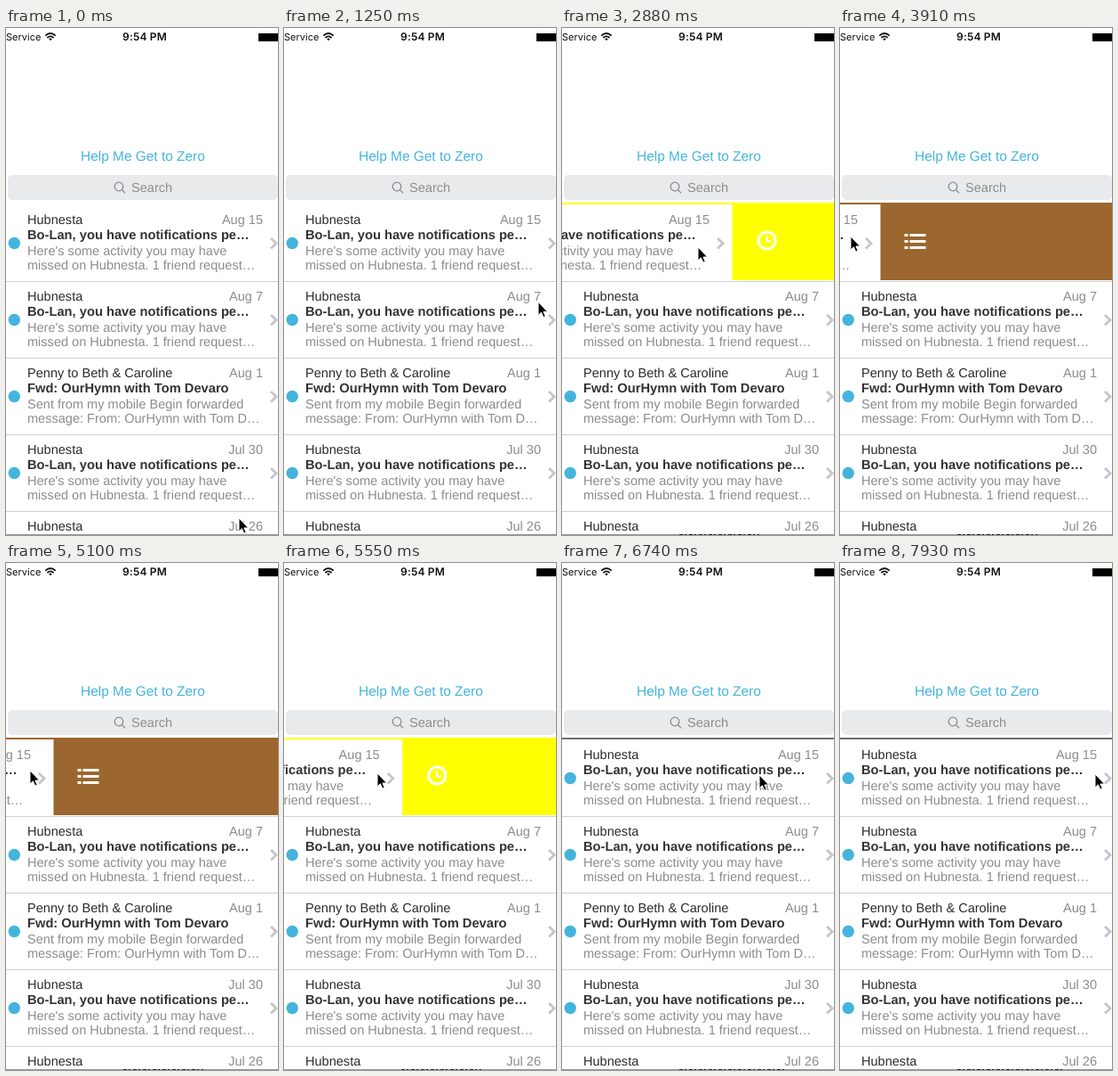
These frames come from a looping animation (306x569 px, 8000 ms). An HTML page:

```html
<!DOCTYPE html>
<html lang="en">
<head>
<meta charset="utf-8">
<title>Swipe a message</title>
<style>
  html, body { margin: 0; width: 100%; height: 100%; overflow: hidden; background: #fff; }
  svg { display: block; width: 306px; height: 569px; }
  text { font: 14.55px "Liberation Sans", sans-serif; fill: #8c8c8c; text-rendering: geometricPrecision; }
  .sender { fill: #2b2b2b; }
  .subject { font-size: 14.7px; font-weight: bold; fill: #333; }
  .date { text-anchor: end; }
  .status { font: 11px Inter, sans-serif; fill: #111; }
  .clock { font-size: 12px; font-weight: 600; letter-spacing: .2px; }
  .button { font-size: 15.45px; fill: #44b4dc; }
  .dot { fill: #44b4dc; }
  .line { fill: none; stroke: #cfcfcf; }
  .chevron { fill: none; stroke: #c5c5c9; stroke-width: 2.8; }
  .icon { fill: none; stroke: #fff; stroke-width: 3; }
</style>
</head>
<body>
<svg viewBox="0 0 306 569">
  <rect width="306" height="569" fill="#fff"/>

  <text class="status" x="0" y="14">Service</text>
  <g fill="none" stroke="#111" stroke-width="1.8">
    <path d="M44.3 8.6Q50 3.4 55.7 8.6M46.4 11Q50 7.8 53.6 11"/>
    <path d="M48.2 12.2Q50 10.8 51.8 12.2L50 14.2z" fill="#111" stroke="none"/>
  </g>
  <text class="status clock" x="131" y="14">9:54 PM</text>
  <rect x="284" y="6" width="22" height="9" fill="#000"/>

  <text class="button" x="84" y="148.6">Help Me Get to Zero</text>
  <rect x="2" y="165" width="304" height="28" rx="5" fill="#e9eaec"/>
  <path d="M130.4 181.6L134 185.2M131.8 178a4.8 4.8 0 1 0-9.6 0a4.8 4.8 0 1 0 9.6 0" fill="none" stroke="#8b8b90" stroke-width="1.3"/>
  <text x="141" y="184">Search</text>

  <g id="actions">
    <rect id="backdrop" y="196" width="306" height="87"/>
    <g id="later" class="icon">
      <circle r="9.6"/>
      <path d="M0-5.5V.8H5" stroke-width="2.2"/>
    </g>
    <path id="list" class="icon" d="M-12-6.5h4m2 0H12M-12 .5h4m2 0H12M-12 7.5h4m2 0H12"/>
  </g>
  <g id="rows"></g>

  <rect y="568" width="306" height="1" fill="#999"/>
  <path id="edge" fill="none" stroke="#222" stroke-dasharray="4 2 2 3"/>
  <path id="cursor" d="M0 0V15L3.4 11.8L5.8 17.2L8.2 16.1L5.9 11H10.6z" fill="#000" stroke="#fff" stroke-width="1" stroke-linejoin="round"/>
</svg>
<script>
const byId = id => document.getElementById(id);

const activity = date => [
  "Hubnesta", date, "Bo-Lan, you have notifications pe…",
  "Here's some activity you may have", "missed on Hubnesta. 1 friend request…"
];
const messages = [
  activity("Aug 15"),
  activity("Aug 7"),
  ["Penny to Beth &amp; Caroline", "Aug 1", "Fwd: OurHymn with Tom Devaro",
   "Sent from my mobile Begin forwarded", "message: From: OurHymn with Tom D…"],
  activity("Jul 30"),
  activity("Jul 26")
];

byId("rows").innerHTML = messages.map(([sender, date, subject, first, second], i) => `
  <g transform="translate(0 ${198 + 86 * i})">
    <g class="row">
      <rect width="314.5" height="86" fill="#fff"/>
      <circle class="dot" cx="9.3" cy="43.5" r="6.7"/>
      <text class="sender" x="24" y="22">${sender}</text>
      <text class="date" x="289" y="22">${date}</text>
      <text class="subject" x="24" y="39">${subject}</text>
      <text x="24" y="56.5">${first}</text>
      <text x="24" y="73.3">${second}</text>
      <path class="chevron" d="M298 38L304 43.7L298 49.4"/>
    </g>
    <path class="line" d="M0 ${i ? .5 : 86.5}H306"/>
  </g>`).join("");
const row = document.querySelector(".row");

// Tracks hold [tick, values...]; a tick is one step of the choppy motion.
const LOOP = 8000, FIRST_TICK = 486, TICK = 148.6;
const PRESS = 7, RELEASED = 42;
const pointer = [
  [-1, 262, 550], [6, 290, 267], [7, 289, 267], [12, 262, 260], [16, 153, 246],
  [23, 12, 234], [26, 7, 233], [29, 7, 233], [31, 27, 233], [38, 209, 240],
  [41, 222, 238], [45, 222, 238], [50, 287, 237]
];
const swipe = [
  [7, 0], [10, -1], [12, -12], [14, -50], [15, -85], [16, -123], [22, -245], [23, -269],
  [26, -275], [29, -275], [31, -261], [38, -75], [40, -58], [42, 0]
];

function sample(track, tick) {
  const next = track.findIndex(key => key[0] > tick);
  if (next < 0) return track.at(-1).slice(1);
  if (next === 0) return track[0].slice(1);
  const a = track[next - 1], b = track[next];
  const p = (tick - a[0]) / (b[0] - a[0]);
  return a.slice(1).map((v, i) => v + (b[i + 1] - v) * p);
}

const move = (el, x, y) => el.setAttribute("transform", `translate(${x} ${y})`);

function draw(time) {
  const tick = Math.max(-1, Math.floor((time % LOOP - FIRST_TICK) / TICK));
  const [x, y] = sample(pointer, tick);
  const [shift] = sample(swipe, tick);
  const pressed = tick >= PRESS;
  const far = shift < -249;
  const iconX = Math.min(313, 315 + shift + 38.5);

  move(byId("cursor"), x, y);
  move(row, shift, 0);
  move(byId("later"), iconX, 238.5);
  move(byId("list"), iconX, 239);
  byId("actions").style.display = pressed ? "" : "none";
  byId("backdrop").style.fill = far ? "#9b672f" : shift < -57 ? "#ff0" : "#6e6e6e";
  byId("later").style.opacity = far ? 0 : Math.min(1, -shift / 57);
  byId("list").style.opacity = far ? 1 : 0;
  byId("edge").setAttribute("d", pressed ? `M132 568.5H${tick < RELEASED ? 222 : 252}` : "");
}

const start = performance.now();
function frame() {
  draw(performance.now() - start);
  requestAnimationFrame(frame);
}
frame();
</script>
</body>
</html>
```
